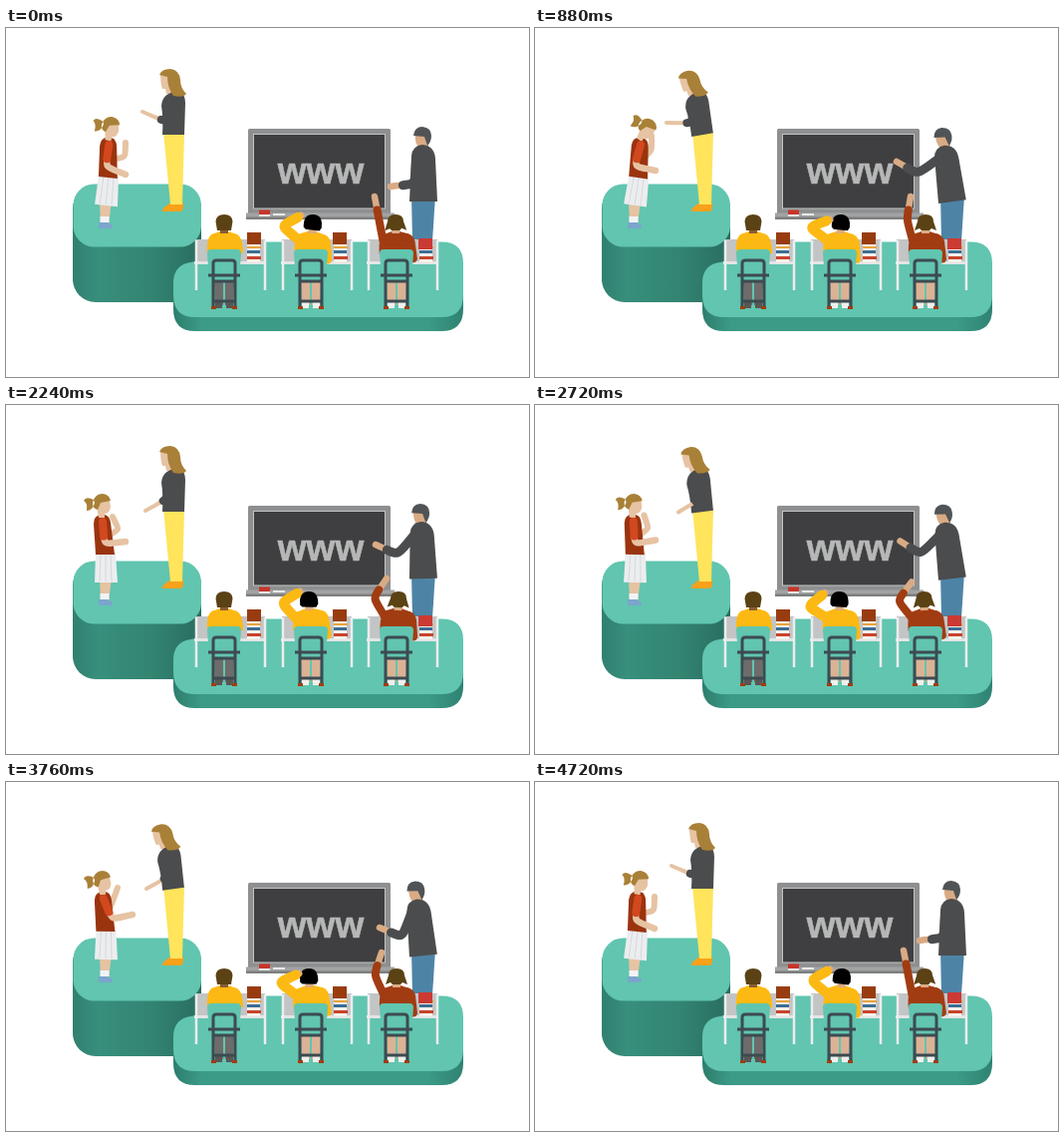
An HTML page that plays this animation: 525 by 350 pixels, repeating every 4800 ms.

```html
<!DOCTYPE html>
<html lang="en">
<head>
<meta charset="utf-8">
<title>Classroom</title>
<style>
  html, body { margin: 0; width: 100%; height: 100%; overflow: hidden; background: #fff; }
  svg { display: block; width: 525px; height: 350px; }
  .skin { fill: #d9ab84; }
  .fair { fill: #e6c3a3; }
  .hair { fill: #a98037; }
  .coat { fill: #4b4c4d; }
  .teal { fill: #61c5af; }
  .brown { fill: #5b4215; }
  .top { fill: var(--top); }
  .leg { fill: var(--leg); }
  .shoe { fill: var(--shoe); }
  .arm path { fill: none; stroke-linecap: round; stroke-linejoin: round; }
</style>
</head>
<body>
<svg viewBox="0 0 525 350">
  <defs>
    <linearGradient id="tall">
      <stop offset="0" stop-color="#31806f"/>
      <stop offset=".2" stop-color="#378f7c"/>
      <stop offset=".6" stop-color="#338572"/>
      <stop offset="1" stop-color="#296d5e"/>
    </linearGradient>
    <linearGradient id="low">
      <stop offset="0" stop-color="#2e7d6c"/>
      <stop offset=".1" stop-color="#3b9b87"/>
      <stop offset=".88" stop-color="#3b9b87"/>
      <stop offset="1" stop-color="#2f8271"/>
    </linearGradient>
    <g id="desk">
      <path fill="#c3c4c5" d="M-29 212H41V235H-29z"/>
      <path fill="#e4e5e5" d="M-30 234H42V237H-30z"/>
      <path fill="none" stroke="#eceded" stroke-width="2.500" d="M-28 213V263M41 213V263"/>
      <path fill="#f4f1ea" d="M23 216H36V235H23z"/>
      <path fill="#e8a33b" d="M23 219H37V221H23z"/>
      <path fill="#3c6d94" d="M23 223H36V226H23z"/>
      <path fill="#c8432c" d="M23 229H37V232H23z"/>
    </g>
    <path id="torso" class="top" d="M-17 226Q-18 207-10 206L-4 204H4L10 206Q19 207 19 226z"/>
    <path id="sideArm" class="top" d="M8 206Q17 206 19 214L21 232Q20 237 14 235z"/>
    <g id="chair">
      <path class="leg" d="M-10 252H-1V278H-9zM1 252H10L9 278H1z"/>
      <path class="shoe" d="M-9 274H-2V281H-9zM2 274H9V281H2z"/>
      <path class="teal" d="M-17 226Q-17 222-13 222H13Q17 222 17 226L15 252Q15 255 12 255H-12Q-15 255-15 252z"/>
      <path fill="none" stroke="#3c4b51" stroke-width="3" stroke-linejoin="round"
        d="M-11 279V236Q-11 233-8 233H8Q11 233 11 236V279M-16 248H16M-11 254H11M-11 274H11"/>
      <path fill="#a13c12" d="M-13 279H-8V282H-13zM8 279H13V282H8z"/>
    </g>
  </defs>

  <rect x="67" y="158" width="129" height="117" rx="23" fill="url(#tall)"/>
  <rect class="teal" x="67.500" y="156.500" width="128.500" height="63" rx="21"/>
  <path fill="url(#low)" d="M168 258Q168 236 188 235H459V282Q459 304 437 304H190Q168 304 168 282z"/>
  <path class="teal" d="M196 214.500H437Q459 214.500 459 236V268Q459 290 437 290H190Q168 290 168 268V256Q168 237 186 235Q196 233 196 224z"/>

  <rect x="243" y="101" width="143" height="86" rx="1.5" fill="#8d8f90"/>
  <rect x="248.5" y="106.500" width="132" height="74.500" fill="#3f3f41" stroke="#c3c4c4"/>
  <path fill="#a2a3a4" d="M241 185.500H390V191H241z"/>
  <path fill="#7d7e7f" d="M241 189.500H390V192H241z"/>
  <path fill="#c8352b" d="M254 182.500H265V187H254z"/>
  <path fill="#e8e8e8" d="M254 187H265V189H254zM268 186H280V188H268z"/>
  <text x="316" y="156" text-anchor="middle" font-family="Liberation Sans, Arial, sans-serif"
    font-weight="bold" font-size="37" fill="#b6b7b7" stroke="#b6b7b7" stroke-width=".6">www</text>

  <!-- Teacher at the board -->
  <path fill="#4d84a6" d="M407 168H431L428 214H408z"/>
  <g id="teacher">
    <path class="skin" d="M411 106H424V119H414Q410 115 411 106z"/>
    <path fill="#515456" d="M409 108Q410 99 418 99Q427 100 427 108Q427 114 423 118L420 109z"/>
    <path class="coat" d="M405 174L407 128Q408 118 418 117Q430 118 431 131L433 174z"/>
  </g>
  <g id="teacherArm" class="arm"></g>

  <!-- Woman and girl -->
  <path fill="#f8a11b" d="M157 183Q157 180 166 175H178V181L176 184H157z"/>
  <path fill="#ffe45c" d="M158 104H179L177 177H165z"/>
  <g id="woman">
    <path class="fair" d="M155 46H166V66H161L160 61H157Q155 55 155 46z"/>
    <path class="coat" d="M157 107Q158 90 156 78Q157 66 169 64H175Q180 67 180 75L179 107z"/>
    <path class="hair" d="M154 47Q156 41 165 41Q174 42 175 52Q175 60 181 66Q178 70 168 68Q162 60 162 49z"/>
  </g>
  <g id="womanArm" class="arm"></g>

  <path class="fair" d="M94 174H106L103 197H95z"/>
  <path fill="#f2f3f5" d="M94.500 189H103.500V195H94.500z"/>
  <path fill="#7ba5cd" d="M93 195H102L107 198V201H93z"/>
  <g id="farArm" class="arm"></g>
  <g id="girl">
    <path fill="#ecedef" d="M90 148H110L112 178H89z"/>
    <path fill="none" stroke="#d6d8dc" d="M95 150L94 177M100 150V177M105 150L106 177"/>
    <path fill="#9a340f" d="M88 119Q88 111 95 110H99Q104 111 105 118L109 150H90z"/>
    <g id="girlHead">
      <path class="fair" d="M90 96H104L105 102Q104 109 99 109V113H93z"/>
      <path class="hair" d="M87 98Q89 89 97 89Q104 90 105 96L95 98L92 105Q87 104 87 98zM88 95Q80 91 78 96Q82 98 81 106Q87 106 89 98z"/>
    </g>
  </g>
  <g id="nearArm" class="arm"></g>

  <!-- Pupils -->
  <g transform="translate(219)" style="--top:#fdb913;--leg:#6d6c6b;--shoe:#5a5655">
    <use href="#desk"/>
    <path fill="#983c10" d="M23 205H37V217H23z"/>
    <use href="#torso"/>
    <path fill="#8a5c31" d="M-4 200H4V206H-4z"/>
    <path class="brown" d="M-8.500 194Q-8 187 0 187Q8 187 8.500 194L7 203H-7z"/>
    <use href="#chair"/>
  </g>
  <g style="--top:#fdb913;--leg:#dcb295;--shoe:#f0efed">
    <g transform="translate(306)">
      <use href="#desk"/>
      <path fill="#983c10" d="M22 205H36V217H22z"/>
    </g>
    <g id="waver"><g transform="translate(306)">
      <use href="#torso"/><use href="#sideArm"/>
      <path class="skin" d="M-4 200H4V206H-4z"/>
      <path d="M-7 202L-9 200Q-10 187 0 187Q10 187 9 200L7 203z"/>
    </g></g>
    <use href="#chair" x="306"/>
  </g>
  <g id="waveArm" class="arm"></g>
  <g style="--top:#a13c12;--leg:#dcb295;--shoe:#f0efed">
    <g transform="translate(392)">
      <use href="#desk"/>
      <path fill="#cb3a33" d="M22 211H36V222H22z"/>
    </g>
    <g id="raiser"><g transform="translate(392)">
      <use href="#torso"/><use href="#sideArm"/>
      <path class="skin" d="M-4 200H4V206H-4z"/>
      <path class="brown" d="M-8 194Q-8 187 0 187Q8 187 8 194L11 203L6 201L4 203H-4L-6 201L-11 203z"/>
    </g></g>
    <use href="#chair" x="392"/>
  </g>
  <g id="raisedArm" class="arm"></g>
</svg>
<script>
const LOOP = 4800, STEP = 80;
const times = [0, 880, 1520, 2240, 3200, 3760, 4720];
const $ = id => document.getElementById(id);

// Each track holds one value per key time; the last key returns to the first.
const bodies = {
  teacher: { pivot: [420, 175], height: 70, lean: [0, -9, -8, -2, -15, -7] },
  woman: { pivot: [169, 107], height: 58, lean: [0, -10, -16, 0, -15, -8] },
  girl: { pivot: [101, 178], height: 68, lean: [7, 10, 6, 0, 4, 1] },
  waver: { pivot: [306, 235], height: 40, lean: [2, 1, -5, -2, 1, -2] },
  raiser: { pivot: [392, 235], height: 40, lean: [-1, 0, -1, 2, -5, 0] }
};
const nod = [3, 24, -5, 0, 2, -5];

const SKIN = '#d9ab84', FAIR = '#e6c3a3', COAT = '#4b4c4d';
const arms = {
  teacherArm: { body: 'teacher', shoulder: [412, 129], upper: 27, lower: 24, bend: -1,
    color: COAT, width: 9, cuff: .82, skin: SKIN, skinWidth: 6.5,
    x: [386, 363, 363, 371, 362, 375], y: [159, 134, 121, 140, 133, 146] },
  womanArm: { body: 'woman', shoulder: [165, 73], upper: 21, lower: 25, bend: -1,
    color: COAT, width: 8, cuff: .65, skin: FAIR, skinWidth: 4,
    x: [137, 132, 132, 140, 148, 141], y: [84, 95, 96, 106, 109, 107] },
  farArm: { body: 'girl', shoulder: [101, 132], upper: 14, lower: 14, bend: 1,
    color: FAIR, width: 6, cuff: 0, skin: FAIR, skinWidth: 6,
    x: [120, 117, 116, 107, 112, 112], y: [115, 108, 116, 112, 109, 106] },
  nearArm: { body: 'girl', shoulder: [97, 117], upper: 22, lower: 21, bend: 1,
    color: '#d2481f', width: 8, cuff: .25, skin: FAIR, skinWidth: 6.5,
    x: [120, 121, 119, 120, 122, 127], y: [147, 143, 146, 137, 134, 133] },
  waveArm: { body: 'waver', shoulder: [291, 212], upper: 19, lower: 21, bend: -1,
    color: '#fdb913', width: 10, cuff: .95, skin: SKIN, skinWidth: 7,
    x: [296, 296, 287, 295, 287, 294], y: [188, 192, 188, 187, 190, 192] },
  raisedArm: { body: 'raiser', shoulder: [379, 213], upper: 22, lower: 23, bend: -1,
    color: '#a13c12', width: 8, cuff: .78, skin: SKIN, skinWidth: 6.5,
    x: [370, 377, 371, 382, 374, 377], y: [169, 169, 169, 174, 181, 171] }
};

for (const [id, arm] of Object.entries(arms)) {
  $(id).innerHTML = `<path stroke="${arm.skin}" stroke-width="${arm.skinWidth}"/>
    <path stroke="${arm.color}" stroke-width="${arm.width}"/>`;
}

function sample(track, t) {
  if (t >= times.at(-1)) return track[0];
  const i = times.findLastIndex(k => k <= t);
  const u = (t - times[i]) / (times[i + 1] - times[i]);
  const a = track[i], b = track[(i + 1) % track.length];
  return a + (b - a) * u * u * (3 - 2 * u);
}

const mix = (a, b, u) => [a[0] + (b[0] - a[0]) * u, a[1] + (b[1] - a[1]) * u];

function rotate([x, y], [cx, cy], angle) {
  const c = Math.cos(angle), s = Math.sin(angle);
  return [cx + (x - cx) * c - (y - cy) * s, cy + (x - cx) * s + (y - cy) * c];
}

// Two-bone reach from shoulder to hand.
function elbowOf([sx, sy], [hx, hy], { upper, lower, bend }) {
  const dx = hx - sx, dy = hy - sy, d = Math.hypot(dx, dy);
  const along = d > upper + lower ? d * upper / (upper + lower)
    : (upper * upper - lower * lower + d * d) / (2 * d);
  const off = bend * Math.sqrt(Math.max(0, upper * upper - along * along));
  return [sx + (dx * along - dy * off) / d, sy + (dy * along + dx * off) / d];
}

// The first part, up to u, of a soft curve bending around the elbow.
function limb(shoulder, elbow, hand, u) {
  const c1 = mix(shoulder, elbow, 1.2), c2 = mix(hand, elbow, 1.2);
  const a = mix(shoulder, c1, u), b = mix(c1, c2, u), c = mix(c2, hand, u);
  const ab = mix(a, b, u), bc = mix(b, c, u);
  return `M${shoulder}C${a} ${ab} ${mix(ab, bc, u)}`;
}

function draw(t) {
  const angles = {};
  for (const [id, { pivot, height, lean }] of Object.entries(bodies)) {
    angles[id] = sample(lean, t) / height;
    $(id).setAttribute('transform', `rotate(${angles[id] * 180 / Math.PI} ${pivot})`);
  }
  $('girlHead').setAttribute('transform', `rotate(${sample(nod, t)} 97 110)`);

  for (const [id, arm] of Object.entries(arms)) {
    const shoulder = rotate(arm.shoulder, bodies[arm.body].pivot, angles[arm.body]);
    const hand = [sample(arm.x, t), sample(arm.y, t)];
    const elbow = elbowOf(shoulder, hand, arm);
    const [skin, sleeve] = $(id).children;
    skin.setAttribute('d', limb(shoulder, elbow, hand, 1));
    sleeve.setAttribute('d', limb(shoulder, elbow, hand, arm.cuff));
  }
}

function frame() {
  draw(Math.floor(performance.now() % LOOP / STEP) * STEP);
  requestAnimationFrame(frame);
}
frame();
</script>
</body>
</html>
```
